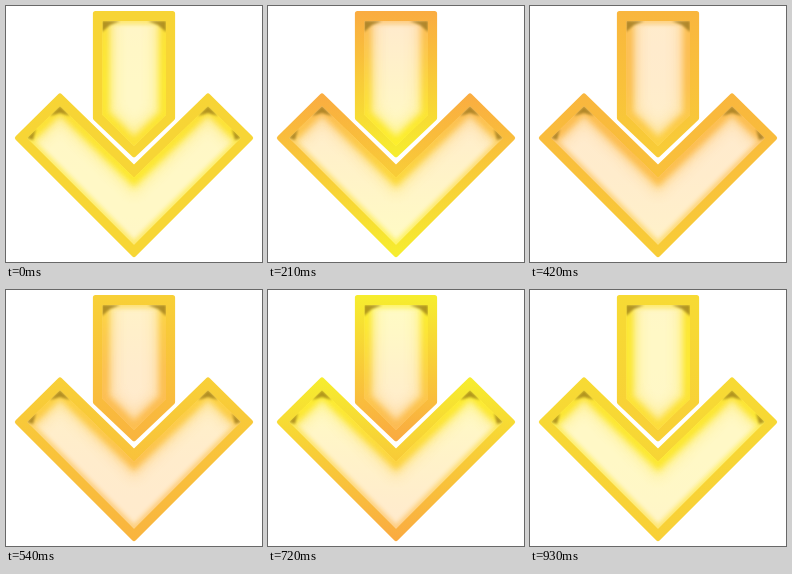
An HTML page for the animation above (960 ms loop, 256 by 256 pixels).

```html
<!DOCTYPE html>
<html lang="en">
<head>
<meta charset="utf-8">
<title>Glowing arrow</title>
<style>
html, body { margin: 0; width: 100%; height: 100%; overflow: hidden; background: #fff; }
svg { display: block; width: 100vw; height: 100vh; }
</style>
</head>
<body>
<svg id="stage" viewBox="0 0 256 256"></svg>
<script>
const LOOP = 960, STEP = 30, STOPS = 5;

// Two-colour ramps: first at level 0 (orange), second at level 1 (yellow)
const RAMPS = {
  rim:  [[250, 168, 66], [246, 238, 46]],
  glow: [[252, 180, 88], [252, 243, 40]],
  core: [[255, 232, 206], [255, 252, 196]]
};

// lit: the inner edges that glow strongly; shade: dark corners under the rim
const PARTS = [
  { id: 'shaft', y0: 6, y1: 151,
    outer: 'M89.5 7.5H166.5V112L128 148.5L89.5 112Z',
    inner: 'M96.5 15H160V109L128 140L96.5 109Z',
    lit: 'M96.5 10V109L128 140L160 109V10',
    shade: ['M96 15H114L104 19L96 26Z', 'M160 15H142L152 19L160 26Z'] },
  { id: 'head', y0: 88, y1: 251,
    outer: 'M11.5 132L54 90L128 162L202 90L244.5 132L128 248.5Z',
    inner: 'M21 132L54 100L128 171.5L202 100L235 132L128 239Z',
    lit: 'M21 132L54 100L128 171.5L202 100L235 132',
    shade: ['M54 100L64 110L54 107L44 110Z', 'M202 100L192 110L202 107L212 110Z',
            'M21 132L30 123L27 134Z', 'M235 132L226 123L229 134Z'] }
];

const gradient = (p, kind) =>
  `<linearGradient id="${p.id}-${kind}" gradientUnits="userSpaceOnUse"
    x1="0" x2="0" y1="${p.y0}" y2="${p.y1}">` +
  Array.from({ length: STOPS }, (_, i) => `<stop offset="${i / (STOPS - 1)}"/>`).join('') +
  '</linearGradient>';

const blur = (id, s) =>
  `<filter id="${id}" filterUnits="userSpaceOnUse" x="-20" y="-20" width="296" height="296"
    color-interpolation-filters="sRGB"><feGaussianBlur stdDeviation="${s}"/></filter>`;

const drawPart = p => {
  const ink = kind => `url(#${p.id}-${kind})`;
  const glow = (d, width, opacity, filter) =>
    `<path d="${d}" fill="none" stroke="${ink('glow')}" stroke-width="${width}"
      opacity="${opacity}" filter="url(#${filter})"/>`;
  return `
  <path d="${p.outer}" fill="${ink('rim')}" stroke="${ink('rim')}" stroke-width="5.2" stroke-linejoin="round"/>
  <g clip-path="url(#${p.id}-clip)">
    <path d="${p.inner}" fill="${ink('core')}"/>
    ${glow(p.lit, 26, 0.3, 'wide')}
    ${glow(p.lit, 14, 0.95, 'soft')}
    ${glow(p.inner, 7, 0.6, 'thin')}
    <g fill="#8a6a14" opacity=".65" filter="url(#fine)">
      ${p.shade.map(d => `<path d="${d}"/>`).join('')}
    </g>
  </g>`;
};

const stage = document.getElementById('stage');
stage.innerHTML = '<defs>' +
  blur('wide', 6) + blur('soft', 3.4) + blur('thin', 2) + blur('fine', 1.2) +
  PARTS.map(p =>
    Object.keys(RAMPS).map(k => gradient(p, k)).join('') +
    `<clipPath id="${p.id}-clip"><path d="${p.inner}"/></clipPath>`).join('') +
  '</defs>' + PARTS.map(drawPart).join('');

const wave = (t, low) => 0.5 - 0.5 * Math.cos(2 * Math.PI * (t - low) / LOOP);
const mix = ([a, b], v) => `rgb(${a.map((c, i) => Math.round(c + (b[i] - c) * v))})`;

// The rim blends its two ends; the inside also carries a wave moving down
function level(kind, t, pos) {
  const blend = wave(t, 280) * (1 - pos) + wave(t, 670) * pos;
  return kind === 'rim' ? blend : (blend + wave(t, 280 + 390 * pos)) / 2;
}

const fills = PARTS.flatMap(p => Object.keys(RAMPS).map(kind => ({
  kind, stops: document.querySelectorAll(`#${p.id}-${kind} stop`)
})));

function render(t) {
  for (const { kind, stops } of fills) {
    stops.forEach((s, i) =>
      s.setAttribute('stop-color', mix(RAMPS[kind], level(kind, t, i / (STOPS - 1)))));
  }
}

const start = performance.now();
function tick() {
  const t = (performance.now() - start) % LOOP;
  render(Math.floor(t / STEP) * STEP);
  requestAnimationFrame(tick);
}
render(0);
requestAnimationFrame(tick);
</script>
</body>
</html>
```
